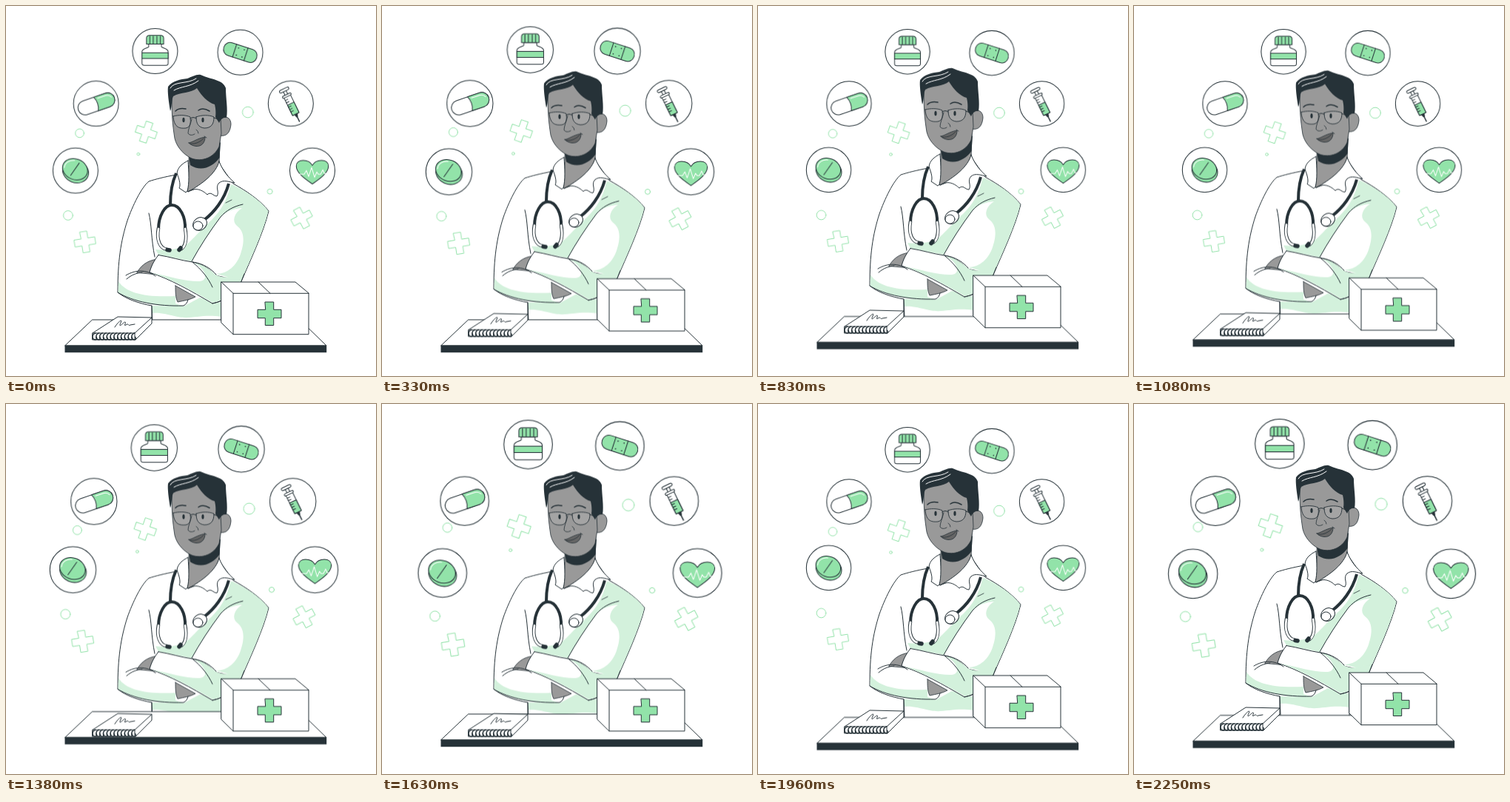
Write an HTML page that moves like this. It is 500 px wide and 500 px high and loops after 2.29 s.

```html
<!DOCTYPE html>
<html lang="en">
<head>
<meta charset="utf-8">
<title>Doctor</title>
<style>
html, body { margin: 0; width: 100%; height: 100%; overflow: hidden; background: #fff; }
svg { display: block; width: 100vw; height: 100vh; }
svg * { stroke-linecap: round; stroke-linejoin: round; }
.ln { fill: none; stroke: #263238; stroke-width: 1; }
.pa { fill: #fff; stroke: #263238; stroke-width: 1; }
.gr { fill: #92e3a9; stroke: #263238; stroke-width: 1; }
.sk { fill: #999; stroke: #263238; stroke-width: .8; }
.sh { fill: #d3f1dc; }
.dk { fill: #263238; }
.wl { fill: none; stroke: #fff; stroke-width: 1; }
.tube { fill: none; stroke: #263238; stroke-width: 4; stroke-linecap: butt; }
.deco { fill: none; stroke: #92e3a9; stroke-width: .95; }

.float { animation: float 2290ms -4ms infinite both steps(18); }
.table { animation: table 2290ms -4ms infinite both steps(18); }
.pulse {
  animation: beat 208.1818ms -4ms infinite both step-end, swell 2290ms -4ms infinite both step-end;
}
.icons { transform-origin: 254px 142px; }
.deco { transform-origin: 246px 235px; }

@keyframes float {
  0%, 65.4545% { transform: translateY(0); }
  32.7273%, 98.1818%, 100% { transform: translateY(-10px); }
}
@keyframes table {
  0%, 21.8182% { transform: translateY(0); }
  54.5455% { transform: translateY(-10px); }
  87.2727% { transform: translateY(0); animation-timing-function: steps(7); }
  100% { transform: translateY(-3.89px); }
}
@keyframes beat {
  0%, 40% { scale: 1; }
  60% { scale: 1.032; }
  80%, 100% { scale: 1.087; }
}
@keyframes swell {
  0% { transform: scale(1.01); }
  4%, 32% { transform: scale(1); }
  27% { transform: scale(1.02); }
  97.8%, 100% { transform: scale(1.012); }
}
</style>
</head>
<body>
<svg viewBox="0 0 500 500">
  <defs>
    <path id="plus" d="M-4.7-14H4.7V-4.7H14V4.7H4.7V14H-4.7V4.7H-14V-4.7H-4.7Z"/>
    <circle id="ring" r="30.2" class="pa"/>
  </defs>

  <g class="deco pulse">
    <circle cx="326" cy="144.4" r="7.3"/>
    <circle cx="101" cy="172.5" r="5.8"/>
    <circle cx="179.5" cy="200.5" r="1.8"/>
    <circle cx="355.5" cy="250.5" r="3.4"/>
    <circle cx="85.5" cy="282.5" r="6.3"/>
    <use href="#plus" transform="translate(190 171) rotate(19)"/>
    <use href="#plus" transform="translate(398 286) rotate(-28)"/>
    <use href="#plus" transform="translate(108 318) rotate(-9)"/>
  </g>

  <g class="icons pulse">
    <g transform="translate(95.5 221.5)">
      <use href="#ring"/>
      <ellipse class="gr" cx=".6" cy="1.2" rx="17.8" ry="14.8" transform="rotate(22)"/>
      <ellipse class="gr" cx="-1.2" cy="-1.4" rx="17.2" ry="13.8" transform="rotate(22)"/>
      <path class="wl" d="M-15-4C-14-11-8-14-1-13.5"/>
      <path class="ln" d="M-6.5 6.5L5-10"/>
    </g>
    <g transform="translate(123 132)">
      <use href="#ring"/>
      <g transform="translate(.4 .3) rotate(-19)">
        <rect class="pa" x="-25.5" y="-9.6" width="51" height="19.2" rx="9.6"/>
        <path class="gr" d="M-.5-9.6H16A9.6 9.6 0 0 1 16 9.6H-.5C2.500 4 2.500-4 -.5-9.6Z"/>
        <path class="wl" d="M4-6.5H15C19-6.500 21-4 22-2"/>
      </g>
    </g>
    <g transform="translate(202 61.7)">
      <use href="#ring"/>
      <path class="pa" d="M-8.5-9.5V-6C-8.5-4-17.5-4-17.5 1V16Q-17.5 19 -14.5 19H14.5Q17.5 19 17.5 16V1C17.5-4 8.5-4 8.5-6V-9.5Z"/>
      <path class="gr" d="M-17.5 2.2H17.5V10H-17.5Z"/>
      <path class="gr" d="M-11.5-9.5V-17Q-11.5-21 -7.5-21H7.5Q11.5-21 11.5-17V-9.5Z"/>
      <path class="ln" d="M-7-20V-10M-2.5-20V-10M2.5-20V-10M7-20V-10"/>
    </g>
    <g transform="translate(316 63.5)">
      <use href="#ring"/>
      <g transform="rotate(18)">
        <rect class="gr" x="-23" y="-9" width="46" height="18" rx="8.5"/>
        <path class="ln" d="M-8-9V9M8-9V9"/>
        <path class="ln" style="stroke-width:1.6" d="M-4-5h0M4-5h0M-4 5h0M4 5h0"/>
      </g>
    </g>
    <g transform="translate(383.5 132)">
      <use href="#ring"/>
      <g transform="rotate(-26)">
        <path class="ln" d="M0 18V26.5" style="stroke-width:1.4"/>
        <path class="pa" d="M-2-19H2V-10H-2Z"/>
        <rect class="pa" x="-4.8" y="-11.5" width="9.6" height="27" rx="1"/>
        <path class="gr" d="M-4.8 0H4.8V15.5H-4.8Z"/>
        <path class="dk" d="M-2.5 15.5H2.5L1 20H-1Z"/>
        <rect class="pa" x="-6.8" y="-22" width="13.6" height="3.6" rx="1.8"/>
        <rect class="pa" x="-6.3" y="-13.5" width="12.6" height="3" rx="1.5"/>
        <path class="ln" d="M-4.8-7H-1M-4.8-3.5H-1M-4.8 3H-1M-4.8 6.5H-1M-4.8 10H-1"/>
      </g>
    </g>
    <g transform="translate(412.4 221.5)">
      <use href="#ring"/>
      <path class="gr" d="M0 18C-7 13-21.5 4-21.5-6C-21.5-16-5-16 0-7C5-16 21.5-16 21.5-6C21.500 4 7 13 0 18Z"/>
      <path class="wl" d="M-18 5H-11L-8 0L-5 8L-1-4L3 9L6 2L8 5H11L14-1L16 4H19"/>
    </g>
  </g>

  <g class="float">
    <!-- coat -->
    <path class="pa" d="M236 218L230 228C214 231 202 234 193 237C183 245 171 270 164 290C155 318 151 345 151 387C162 396 180 402 197 405V440H291V401C301 397 312 386 318 372C330 344 348 306 355 277C343 262 325 250 307 240L288 213Z"/>
    <path class="sh" d="M305 241C325 250 343 262 354.5 277C348 305 330 343 318 371L284 362C300 362 312 350 317 335C323 318 322 304 312 297C305 291 308 280 319 273C306 274 297 278 290 285C275 305 262 325 251 345L206 336L202 329C222 331 238 328 248 319C258 309 266 300 278 289C290 277 299 262 303 243Z"/>
    <path class="sh" d="M197.5 405L240 406L262 394L290.5 401V420C265 416 250 424 232 420C218 417 208 414 198 415Z"/>
    <path class="sh" d="M152 372C162 388 188 394 229 392V402L240 406C205 407 172 400 151.5 387Z"/>
    <path class="ln" d="M193 280C197 295 196 315 201 339M197 405L198 430M320 268C307 271 298 276 290 285C275 305 262 325 251 345"/>

    <!-- left forearm and hands -->
    <path class="sk" d="M177 360C182 352 189 344 205 342L198 362Z"/>
    <path class="ln" d="M162 364C175 356 190 356 202 365M163 369C170 363 176 361 184 360"/>
    <path class="sk" d="M229 378L256 393C249 397 241 398 232 400C229 394 229 386 229 378Z"/>
    <path class="ln" d="M151 387C172 400 205 406 240 405C244 403 245 400 246 397"/>

    <!-- right forearm -->
    <path class="pa" d="M206 336.5C200 344 196 352 194 360C222 369 250 385 279 402C298 398 310 388 318 372L283 364C274 354 263 348 252 346C237 344 222 339 206 336.5Z"/>
    <path class="sh" d="M196 360C222 366 246 373 262 372C276 370 268 354 254 347C266 349 276 356 283 363C298 371 308 362 320 363L318 371.500C310 387 298 397 279.5 401C252 385 226 370 196 360Z"/>
    <path class="ln" d="M252 346C268 348 278 356 284 363M253 347C264 356 273 367 279 380M322 362L318 372C310 388 298 398 279 402"/>

    <!-- neck and collar -->
    <path class="sk" d="M247 200C248 218 246 235 245 251C262 247 278 232 288 214L289 182Z"/>
    <path class="dk" d="M247 203L262 207L290 184L288.500 205C280 217 264 225 249 215Z"/>
    <path class="pa" d="M246 209C238 213 232 218 231 226C235 236 236 243 234 246L243 252L245 250C248 240 247 224 246 209Z"/>
    <path class="pa" d="M288 210C284 226 266 240 246 251C256 244 266 249 272 255C277 250 280 257 285 257C289 251 282 245 288 239C294 234 302 238 309 239C301 232 293 223 288 210Z"/>

    <!-- stethoscope -->
    <path class="tube" d="M230 226C224 239 222 253 222 269M301 240C295 262 281 279 268 289"/>
    <path class="tube" d="M206 302C206 283 215 269 224 269C235 269 243 285 242 302"/>
    <path class="tube" d="M206 300C203 316 208 328 218 329M242 300C245 316 242 327 235 329" style="stroke-width:4.6"/>
    <path class="wl" d="M206 301C203 316 208 327 216 328.5M242 301C245 316 242 326 237 328" style="stroke-width:2.8"/>
    <path class="tube" style="stroke-width:5.5;stroke-linecap:round" d="M218 329.5L221 330M234 329.5L236 327"/>
    <ellipse class="pa" cx="262" cy="294.5" rx="10" ry="8.3" transform="rotate(-35 262 294.5)"/>
    <ellipse class="pa" cx="259.5" cy="297" rx="6.5" ry="6"/>
    <path class="ln" d="M297 266L305 262" style="stroke-width:.8"/>

    <!-- head -->
    <path class="sk" d="M287 156C292 147 304 148 304 160C303 171 298 177 289 175Z"/>
    <path class="sk" d="M225 118C223 140 225 160 228 179C231 192 242 202 251 206C265 211 281 205 288 190L291 172L290 150L284 118L255 108Z"/>
    <path class="dk" d="M222 142C220 130 218 116 219 109C225 101 236 99 245 98C251 96 257 92 263 93C271 97 280 98 286 101C293 103 296 108 297 111C297 125 300 139 298 151C294 150 290 153 288 158L283 150C284 144 283 137 282 133C272 130 265 122 258 111C250 118 236 116 226 122C223 128 225 135 222 142Z"/>
    <path class="wl" d="M222 111C227 101 245 106 257 98M227 114C237 108 248 110 260 101"/>
    <path class="ln" style="stroke-width:1.5" d="M229 142C232 139 238 138 243 139M260 141C264 138 270 139 275 142"/>
    <g style="stroke-width:.9">
      <path d="M226 149C233 147 243 147 249 150C250 158 249 164 243 165C233 166 227 163 226 149ZM257 150C264 147 275 147 281 150C281 160 277 165 268 165C260 164 257 159 257 150Z" fill="#a4a4a4" stroke="#263238"/>
      <path class="ln" d="M249 152Q253 149 257 152M281 151L289 154"/>
    </g>
    <ellipse cx="240" cy="154" rx="1.6" ry="3.2" class="dk"/>
    <ellipse cx="266" cy="154" rx="1.6" ry="3.2" class="dk"/>
    <path class="ln" style="stroke-width:.8" d="M251 153C249 161 246 167 246 172C248 175 252 175 255 173M257 167Q260 169 260 172"/>
    <path d="M247 185C253 184 258 179 269 177C269 185 264 190 257 189.500C253 189 250 188 247 185Z" fill="#666" stroke="#263238" stroke-width=".8"/>
    <path class="ln" style="stroke-width:.8" d="M249 186C257 187 263 183 267 179M268 176L271 178"/>
  </g>

  <g class="table">
    <path class="pa" d="M117 424H397L433 459H80Z"/>
    <path class="dk" d="M79.5 458.5H433.2V468.3H79.5Z"/>
  </g>

  <g class="float">
    <path class="pa" d="M117 442L151 420L197 421V429L175 451H117Z"/>
    <path class="ln" d="M117 442H174L197 421M174 442V450"/>
    <path class="ln" d="M147 434C152 426 158 422 155 428C151 437 159 427 161 427C163 428 158 433 162 431C166 428 165 433 168 431L174 430"/>
    <g id="coil" class="ln" style="stroke-width:1.5"></g>
  </g>

  <g class="float">
    <path class="pa" d="M291 373H391L409 388V443.7H307L291 428Z"/>
    <path class="ln" d="M291 373L307 388.3H409M307 388.3V443.7M341 373L357 388.3"/>
    <path class="gr" d="M350.3 400H361.7V410.3H372V421.7H361.7V431.5H350.3V421.7H340V410.3H350.3Z"/>
  </g>
</svg>
<script>
const coil = document.getElementById("coil");
for (let i = 0; i < 12; i++) {
  const loop = document.createElementNS("http://www.w3.org/2000/svg", "path");
  loop.setAttribute("d", `M${121 + i * 4.8} 442c-5 1-5 8-1.500 8.800s3.500-2 2.500-3.500`);
  coil.append(loop);
}
</script>
</body>
</html>
```
